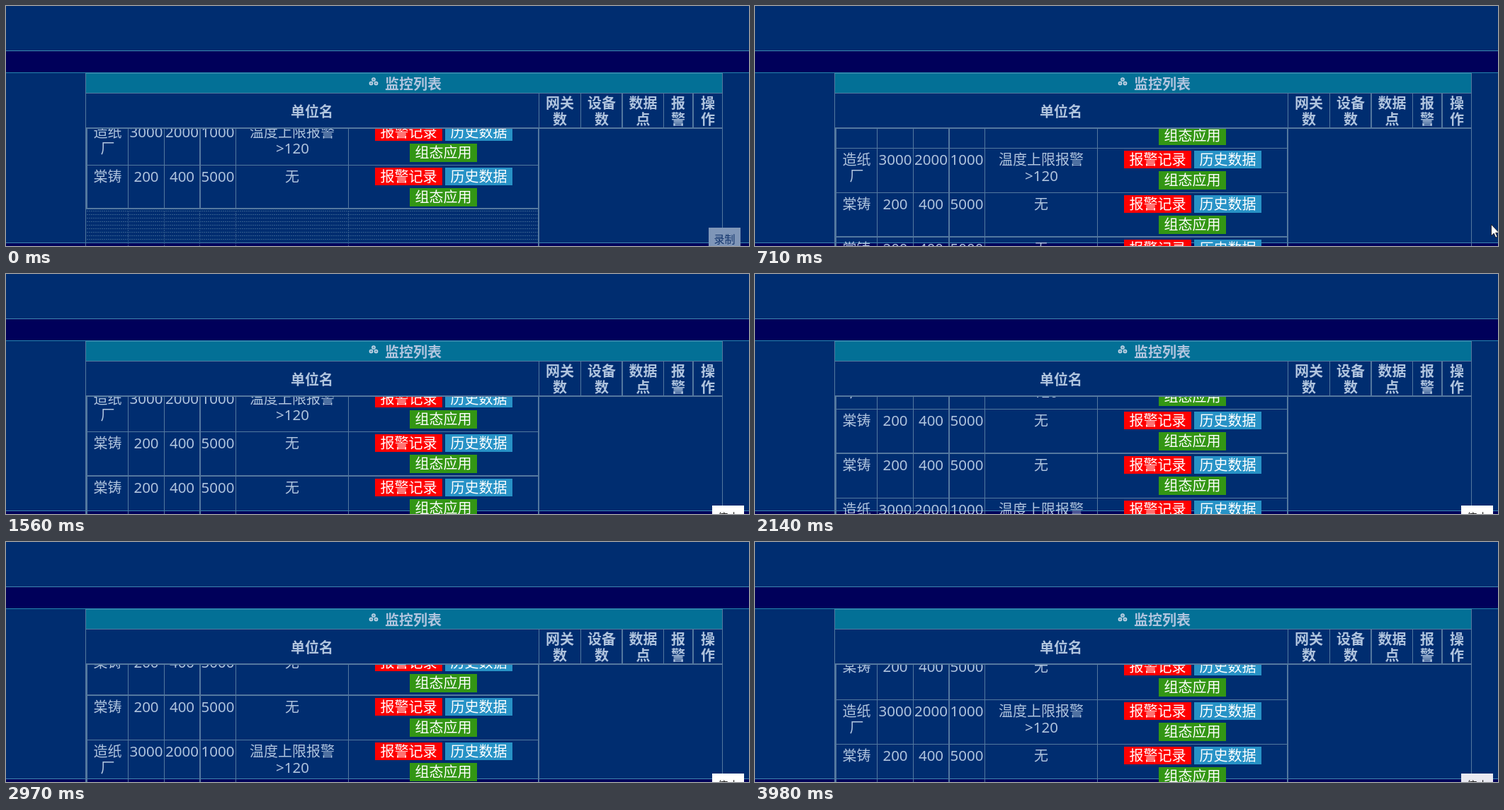
An HTML page for the animation above (4 s loop, 1049 px wide and 340 px high).

```html
<!DOCTYPE html>
<html lang="zh-CN">
<head>
<meta charset="utf-8">
<title>监控列表</title>
<style>
  html, body { margin: 0; width: 100%; height: 100%; overflow: hidden; background: #002d70; }
  svg { display: block; }
  text { font: 20px "Noto Sans CJK SC", "Noto Sans CJK", sans-serif; text-anchor: middle; fill: #b0c4de; }
  .num { font: 20.5px "Noto Sans", "Open Sans", sans-serif; }
  .bold { font-weight: 700; }
  .btn { fill: #fff; }
  .small { font-size: 15px; }
  line, rect { shape-rendering: crispEdges; }
</style>
</head>
<body>
<svg id="stage" width="1049" height="340" viewBox="0 0 1049 340">
  <defs><clipPath id="listArea"><rect x="112" y="174" width="642" height="166"/></clipPath></defs>
</svg>
<script>
const stage = document.getElementById('stage');
const LOOP = 4000;
const BORDER = '#54789f';
const COLUMNS = [[113, 2], [172, 1], [223, 1], [273, 2], [324, 1], [483, 1], [751, 2]];

function add(parent, tag, attrs, content) {
  const el = document.createElementNS('http://www.w3.org/2000/svg', tag);
  for (const key in attrs) el.setAttribute(key, attrs[key]);
  if (content) el.textContent = content;
  return parent.appendChild(el);
}
const rect = (parent, x, y, width, height, fill) => add(parent, 'rect', { x, y, width, height, fill });
// Text is placed by the middle of its glyphs.
const label = (parent, x, y, content, cls = '') =>
  add(parent, 'text', { x, y: y + 7.5, class: cls }, content);

function drawPage() {
  rect(stage, 0, 0, 1049, 340, '#002d70');
  rect(stage, 0, 64, 1049, 30, '#00005a');
  rect(stage, 0, 63, 1049, 1, '#3f86b0');
  rect(stage, 0, 94, 1049, 1, '#2486ac');
  rect(stage, 0, 336, 1049, 4, '#00005a');
  rect(stage, 0, 335, 1049, 1, '#3f86b0');
}

function drawHeader() {
  rect(stage, 113, 95, 899, 29, '#037096');
  rect(stage, 112, 95, 900, 1, '#3585a8');
  rect(stage, 112, 123, 900, 1, BORDER);
  rect(stage, 112, 172, 900, 2, BORDER);
  rect(stage, 112, 95, 1, 245, BORDER);
  rect(stage, 1011, 95, 1, 245, BORDER);
  for (const [x, w] of [[752, 1], [811, 1], [869, 2], [928, 1], [969, 2]]) {
    rect(stage, x, 124, w, 49, BORDER);
  }
  for (const [cx, cy] of [[519, 104], [515.5, 109.5], [522.5, 109.5]]) {
    add(stage, 'circle', { cx, cy, r: 2.2, fill: '#6d9fbb', stroke: '#c9d9ea', 'stroke-width': 1.3 });
  }
  label(stage, 575, 110, '监控列表', 'bold');
  label(stage, 432, 149, '单位名', 'bold');
  const heads = [[782, '网关', '数'], [841, '设备', '数'], [899.5, '数据', '点'], [949, '报', '警'], [991, '操', '作']];
  for (const [x, top, bottom] of heads) {
    label(stage, x, 137, top, 'bold');
    label(stage, x, 160, bottom, 'bold');
  }
}

function button(parent, x, y, height, fill, content) {
  rect(parent, x, y - 13, 95, height, fill);
  label(parent, x + 47.5, y - 0.5, content, 'btn');
}

// Row origin is the middle of its buttons' first line.
function drawRow(parent, paper, startsTable) {
  const row = add(parent, 'g', {});
  for (const [x, w] of COLUMNS) rect(row, x, -17, w, 63, BORDER);
  rect(row, 113, startsTable ? -18 : -17, 640, startsTable ? 2 : 1, BORDER);
  if (paper) {
    label(row, 143.5, -1, '造纸');
    label(row, 143.5, 22, '厂');
    label(row, 404, -1, '温度上限报警');
    label(row, 404.5, 22, '>120', 'num');
  } else {
    label(row, 143.5, -1, '棠铸');
    label(row, 404, -1, '无');
  }
  const values = paper ? ['3000', '2000', '1000'] : ['200', '400', '5000'];
  values.forEach((v, i) => label(row, [198, 248.5, 299][i], -1, v, 'num'));
  button(row, 521, 0, 25, '#f00', '报警记录');
  button(row, 620, 0, 25, '#2792c6', '历史数据');
  button(row, 570, 29, 26, '#339614', '组态应用');
  return row;
}

// Collapsed rows below the last one, closed off by the table's lower edge.
function drawEmptyRows(parent) {
  const g = add(parent, 'g', {});
  rect(g, 113, -4, 640, 2, BORDER);
  const dots = add(g, 'g', { opacity: 0.65 });
  const dotted = (x1, y1, x2, y2) =>
    add(dots, 'line', { x1, y1, x2, y2, stroke: BORDER, 'stroke-dasharray': '2 1' });
  for (let i = 0; i < 10; i++) dotted(114, i * 5 + 0.5, 752, i * 5 + 0.5);
  for (const [x] of COLUMNS.slice(1, -1)) dotted(x + 0.5, 0, x + 0.5, 50);
  return g;
}

drawPage();
const list = add(stage, 'g', { 'clip-path': 'url(#listArea)' });
const parts = [0, 62.5, 125.5, 189, 252, 314.5].map((offset, i) => ({
  offset,
  el: drawRow(list, i % 3 === 1, i % 3 === 0)
}));
parts.push({ offset: 363, el: drawEmptyRows(list) });
rect(list, 751, 174, 2, 166, BORDER);
drawHeader();

const recordButton = add(stage, 'g', {});
rect(recordButton, 992, 314, 45, 26, '#7f96b8');
add(recordButton, 'text', { x: 1014.5, y: 336, class: 'small', style: 'fill:#12346c' }, '录制');

const stopButton = add(stage, 'g', {});
const stopFace = rect(stopButton, 997, 328, 45, 12, '#fff');
add(stopButton, 'text', { x: 1019.5, y: 350, class: 'small', style: 'fill:#222' }, '停止');

const pointer = add(stage, 'path', {
  d: 'M1039.5 309.5v16l3.7-3.4 2.6 6 2.4-1-2.6-5.8h5z', fill: '#fff', stroke: '#111', 'stroke-width': 0.8
});

// [time, position of the first row]
const SCROLL = [[20, 191], [710, 155.5], [1560, 114.5], [2140, 82.5], [2710, 60],
  [2970, 45.5], [3590, 11.5], [3980, -11.5], [4000, -12.5]];

function scrollAt(t) {
  if (t < 20) return -73;
  const i = Math.max(1, SCROLL.findIndex(([time]) => t <= time));
  const [t0, y0] = SCROLL[i - 1], [t1, y1] = SCROLL[i];
  return y0 + (y1 - y0) * (t - t0) / (t1 - t0);
}

const show = (el, on) => el.setAttribute('visibility', on ? 'visible' : 'hidden');

function render(t) {
  const y = scrollAt(t);
  for (const { el, offset } of parts) el.setAttribute('transform', `translate(0 ${Math.round(y + offset)})`);
  recordButton.setAttribute('opacity', Math.max(0, Math.min(1, (150 - t) / 130)));
  show(pointer, t >= 620 && t < 900);
  show(stopButton, t >= 1300);
  stopFace.setAttribute('fill', t >= 3900 ? '#e9e9f1' : '#fff');
}

const start = performance.now();
function tick() {
  render((performance.now() - start) % LOOP);
  requestAnimationFrame(tick);
}
tick();
</script>
</body>
</html>
```
